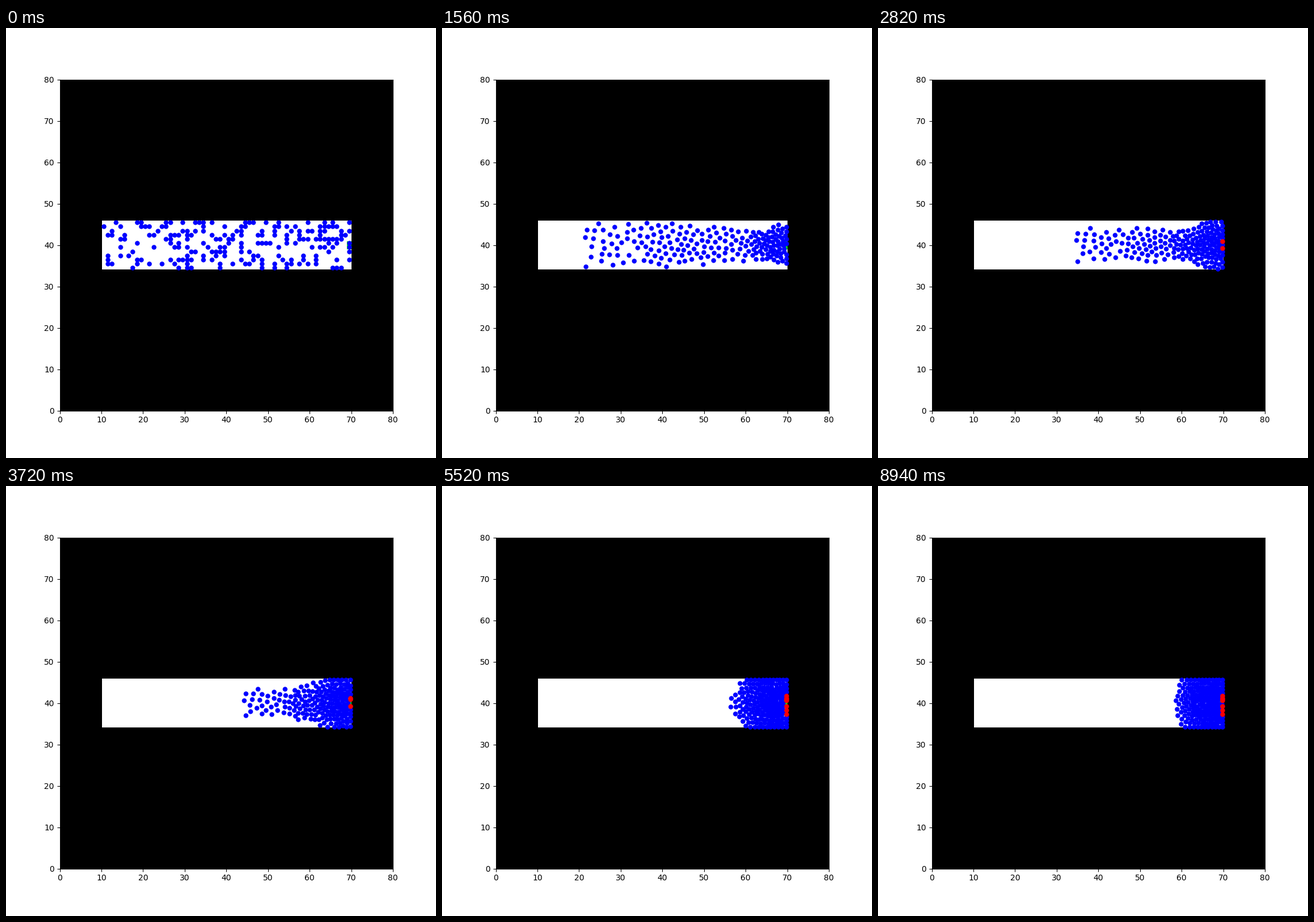
Write a matplotlib script that moves like this. It is 748 by 748 pixels and loops after 9000 ms.

```python
import numpy as np
import matplotlib.pyplot as plt
from matplotlib.animation import FuncAnimation
from matplotlib.patches import Rectangle

FRAMES, INTERVAL = 150, 60
SUBSTEPS = 5
CROWD = 200

EXIT = np.array([70.0, 40.0])
LOW, HIGH = np.array([10.2, 34.2]), np.array([69.7, 45.7])

SPEED, RELAX = 0.66, 9.0                 # walking speed per frame, reaction time
PUSH, REACH, FALLOFF = 0.042, 1.2, 0.18  # repulsion between neighbours
MAX_PUSH = 1.2
EXIT_EVERY = 6

# Occupied columns in the sparse rear of the corridor, rows from top to bottom
REAR = [
    (13, 18, 19, 25, 26, 29),
    (10, 14, 19, 20, 21, 24, 25),
    (12, 23, 29),
    (11, 12, 15, 21, 22, 26, 27, 28),
    (14, 15, 25, 26),
    (18, 26, 28),
    (14, 22, 27, 28),
    (17,),
    (11, 14, 16),
    (11, 18, 19, 26, 28, 29),
    (11, 12, 18, 21, 24, 27),
    (17, 28),
]

# Frame at which somebody is crushed against the wall, and the height there
CRUSHED = {34: 40.9, 40: 39.2, 56: 41.2, 68: 38.3, 74: 41.8, 80: 37.3, 86: 40.6}


def start_positions():
    rear = [(x + 0.5, 45.5 - row) for row, xs in enumerate(REAR) for x in xs]
    beside_exit = [(69.5, y) for y in (45.5, 43.5, 40.5, 39.5, 38.5, 36.5)]
    rng = np.random.default_rng(12)
    cells = rng.choice(39 * 12, CROWD - len(rear) - len(beside_exit), replace=False)
    front = np.column_stack([30.5 + cells % 39, 34.5 + cells // 39])
    return np.vstack([rear, beside_exit, front])


def step(pos, vel, fixed, dt):
    gap = pos[:, None] - pos[None]
    dist = np.sqrt((gap ** 2).sum(-1)) + 1e-6
    force = np.minimum(PUSH * np.exp((REACH - dist) / FALLOFF), MAX_PUSH)
    np.fill_diagonal(force, 0)
    push = (gap * (force / dist)[..., None]).sum(1)

    way = EXIT - pos
    way /= np.maximum(np.linalg.norm(way, axis=1), 0.3)[:, None]
    drag = 1 / RELAX + 0.5 * force.sum(1)[:, None]
    vel = (vel + dt * (way * SPEED / RELAX + push)) / (1 + dt * drag)
    vel[fixed] = 0

    moved = pos + dt * vel
    inside = np.clip(moved, LOW, HIGH)
    vel[moved != inside] = 0
    return inside, vel


def nearest(pos, fixed, spot):
    dist = np.linalg.norm(pos - spot, axis=1)
    dist[fixed] = np.inf
    i = dist.argmin()
    return i, dist[i]


def simulate():
    pos = start_positions()
    vel = np.zeros_like(pos)
    fixed = np.zeros(len(pos), bool)
    history = [(pos.copy(), fixed.copy())]
    for frame in range(1, FRAMES):
        for _ in range(SUBSTEPS):
            pos, vel = step(pos, vel, fixed, 1 / SUBSTEPS)
        if frame in CRUSHED:
            spot = np.array([HIGH[0], CRUSHED[frame]])
            i, _ = nearest(pos, fixed, spot)
            pos[i], fixed[i] = spot, True
        if frame % EXIT_EVERY == 0:
            i, dist = nearest(pos, fixed, np.array([HIGH[0], EXIT[1]]))
            if dist < 0.8:
                pos, vel = np.delete(pos, i, 0), np.delete(vel, i, 0)
                fixed = np.delete(fixed, i)
        history.append((pos.copy(), fixed.copy()))
    return history


history = simulate()

fig, ax = plt.subplots(figsize=(7.48, 7.48), dpi=100)
ax.set_facecolor("black")
ax.set_xlim(0, 80)
ax.set_ylim(0, 80)
ax.add_patch(Rectangle((10.1, 34.1), 59.9, 11.8, color="white", lw=0))
ax.add_patch(Rectangle((69, 39), 1, 2, color="lime", lw=0))
walkers, = ax.plot([], [], "o", color="blue", ms=5, zorder=3)
crushed, = ax.plot([], [], "o", color="red", ms=5, zorder=4)


def draw(frame):
    pos, fixed = history[frame]
    walkers.set_data(*pos[~fixed].T)
    crushed.set_data(*pos[fixed].T)
    return walkers, crushed


anim = FuncAnimation(fig, draw, frames=FRAMES, interval=INTERVAL,
                     init_func=lambda: draw(0), repeat=True, repeat_delay=0)
plt.show()
```
